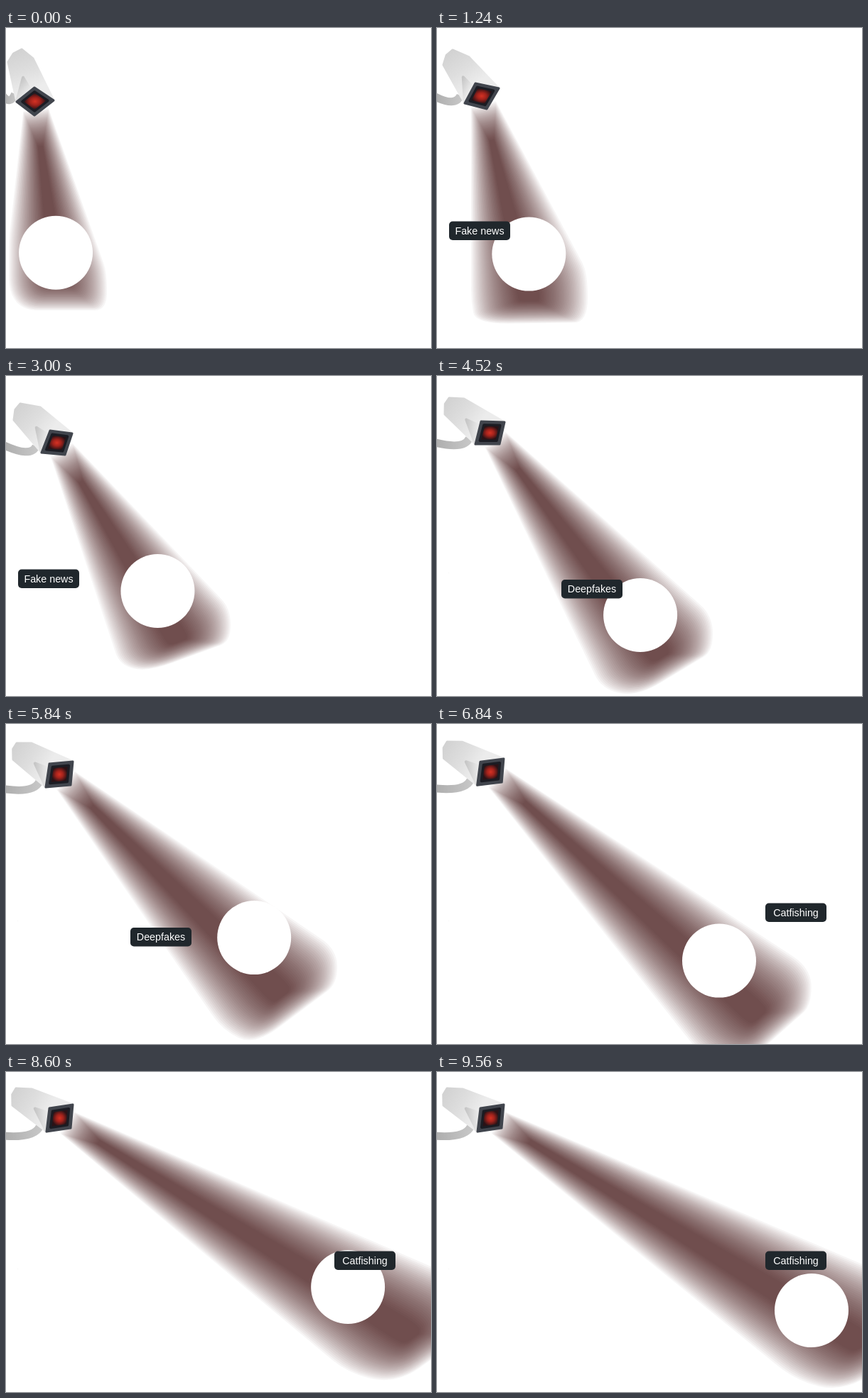
Animation, 598 px wide and 451 px high, one loop 9.6 s. Source, as an HTML page:

```html
<!DOCTYPE html>
<html lang="en">
<head>
<meta charset="utf-8">
<title>Searchlight camera</title>
<style>
  html, body { margin: 0; width: 100%; height: 100%; overflow: hidden; background: #fff; }
  svg { display: block; width: 598px; height: 451px; }
  text { font: 14.3px "Liberation Sans", Arial, sans-serif; fill: #fff; text-anchor: middle; }
</style>
</head>
<body>
<svg id="stage" viewBox="0 0 598 451">
  <defs>
    <linearGradient id="metal" gradientUnits="userSpaceOnUse">
      <stop offset="0" stop-color="#d2d2d2"/>
      <stop offset=".55" stop-color="#dedede"/>
      <stop offset="1" stop-color="#ececec"/>
    </linearGradient>
    <linearGradient id="under" gradientUnits="userSpaceOnUse">
      <stop offset="0" stop-color="#c6c6c6"/>
      <stop offset="1" stop-color="#f0f0f0"/>
    </linearGradient>
    <linearGradient id="tube">
      <stop offset="0" stop-color="#acacac"/>
      <stop offset="1" stop-color="#c6c6c6"/>
    </linearGradient>
    <radialGradient id="glow">
      <stop offset="0" stop-color="#d43224"/>
      <stop offset=".45" stop-color="#a3231c"/>
      <stop offset="1" stop-color="#2a1216"/>
    </radialGradient>
  </defs>
  <g id="beam" fill="#401616"></g>
  <circle id="disc" r="52" fill="#fff"/>
  <path id="arm" fill="none" stroke="url(#tube)" stroke-width="11"/>
  <path id="body" fill="url(#metal)" stroke="url(#metal)" stroke-width="3" stroke-linejoin="round"/>
  <path id="belly" fill="url(#under)" stroke="url(#under)" stroke-width="4" stroke-linejoin="round"/>
  <path id="bezel" fill="#41454d" stroke="#41454d" stroke-width="3" stroke-linejoin="round"/>
  <path id="glass" fill="#1b1c23" stroke="#1b1c23" stroke-width="4" stroke-linejoin="round"/>
  <path id="eye" fill="url(#glow)" stroke-linejoin="round"/>
  <g id="labels"></g>
</svg>
<script>
const LOOP = 9600, LAYERS = 30, NS = 'http://www.w3.org/2000/svg';
const $ = id => document.getElementById(id);

// far end of the light: lower edge, bottom, right, upper edge
const beamTimes = [0, 1240, 3000, 4520, 5840, 7840, 9000];
const beamKeys = [
  [4, 300, 4, 398, 142, 398, 142, 345],
  [48, 385, 54, 417, 212, 415, 212, 345],
  [160, 408, 200, 417, 316, 374, 316, 328],
  [232, 442, 282, 452, 388, 388, 388, 338],
  [305, 432, 350, 453, 466, 366, 466, 318],
  [440, 446, 510, 455, 592, 375, 592, 316],
  [505, 435, 570, 451, 690, 380, 690, 310]
];

// lens corners clockwise, then back of the housing: left, top, right
const camTimes = [0, 1240, 3000, 4520, 5840, 7840];
const camKeys = [
  [40, 84, 67, 102, 40, 123, 15, 104, 3, 48, 22, 30, 38, 43],
  [54, 78, 87, 85, 70, 114, 39, 106, 9, 52, 22, 31, 45, 41],
  [62, 77, 93, 81, 83, 111, 50, 108, 11, 62, 20, 39, 48, 44],
  [62, 64, 95, 65, 88, 96, 54, 96, 11, 54, 17, 31, 38, 32],
  [61, 56, 94, 53, 91, 86, 56, 89, 10, 50, 15, 27, 36, 27],
  [61, 51, 94, 46, 91, 79, 57, 84, 9, 47, 14, 23, 36, 24]
];

const labels = [
  ['Fake news', 17, 272.5, 800, 3600],
  ['Deepfakes', 175, 287, 3600, 6400],
  ['Catfishing', 462, 252.5, 6400, 9600]
];

function add(parent, tag, attrs) {
  const el = document.createElementNS(NS, tag);
  set(el, attrs);
  parent.appendChild(el);
  return el;
}
function set(el, attrs) {
  for (const name in attrs) el.setAttribute(name, attrs[name]);
}

const bob = t => 18 * Math.cos(2 * Math.PI * (t - 4500) / 2600);
const mix = (p, q, k) => [p[0] + (q[0] - p[0]) * k, p[1] + (q[1] - p[1]) * k];
const xy = p => p[0].toFixed(2) + ' ' + p[1].toFixed(2);
const poly = pts => 'M' + pts.map(xy).join('L') + 'Z';
const pairs = v => Array.from({ length: v.length / 2 }, (_, i) => [v[2 * i], v[2 * i + 1]]);

// smooth curve through the keys
function sample(times, keys, t) {
  const last = times.length - 1;
  if (t >= times[last]) return keys[last];
  let i = 0;
  while (t >= times[i + 1]) i++;
  const span = times[i + 1] - times[i], u = (t - times[i]) / span;
  const slope = (j, n) => {
    const a = Math.max(0, j - 1), b = Math.min(last, j + 1);
    return (keys[b][n] - keys[a][n]) / (times[b] - times[a]) * span;
  };
  return keys[i].map((p, n) => {
    const d = keys[i + 1][n] - p, m = slope(i, n), e = slope(i + 1, n);
    return p + u * (m + u * (3 * d - 2 * m - e + u * (m + e - 2 * d)));
  });
}

// keys of the light without the bobbing, which is added back at each moment
const calmKeys = beamKeys.map((key, i) =>
  key.map((v, n) => n % 2 ? v - bob(beamTimes[i]) : v));

const layers = Array.from({ length: LAYERS }, () =>
  add($('beam'), 'path', { 'fill-opacity': 1 - Math.pow(0.29, 1 / LAYERS) }));

const tags = labels.map(([word, x, y]) => {
  const g = add($('labels'), 'g', { transform: `translate(${x} ${y})` });
  add(g, 'rect', { width: 86, height: 26.5, rx: 5, fill: '#20272c' });
  add(g, 'text', { x: 43, y: 18 }).textContent = word;
  return g;
});

function drawBeam(t, lens) {
  const now = Math.min(t, 9000);
  const far = pairs(sample(beamTimes, calmKeys, now)).map(p => [p[0], p[1] + bob(now)]);
  const mid = mix(mix(far[0], far[3], 0.5), mix(far[1], far[2], 0.5), 0.5);
  const dx = mid[0] - lens[0], dy = mid[1] - lens[1], len = Math.hypot(dx, dy);
  const ux = dx / len, uy = dy / len;
  const at = (d, side) => [lens[0] + ux * d - uy * side, lens[1] + uy * d + ux * side];
  const start = at(75, 0), end = mix(lens, mid, 0.96);
  const near = [at(12, 18), at(12, -18)];
  layers.forEach((path, i) => {
    const k = 1 - 0.82 * i / (LAYERS - 1);
    const [n1, n2] = near.map(p => mix(start, p, k));
    const [a, b, c, d] = far.map(p => mix(end, p, k));
    const r = 0.3;
    path.setAttribute('d', `M${xy(n1)}L${xy(mix(a, n1, 0.06))}Q${xy(a)} ${xy(mix(a, b, 0.5))}` +
      `Q${xy(b)} ${xy(mix(b, c, r))}L${xy(mix(c, b, 0.12))}Q${xy(c)} ${xy(mix(c, d, 0.5))}` +
      `Q${xy(d)} ${xy(mix(d, n2, 0.06))}L${xy(n2)}Z`);
  });
}

function drawCamera(pts, lens) {
  const [a, b, c, d, left, top, right] = pts;
  const shrink = k => [a, b, c, d].map(p => mix(lens, p, k));
  const joint = mix(left, d, 0.8);
  const bend = [joint[0] - 7, joint[1] + 17];
  $('arm').setAttribute('d', `M-5 ${(joint[1] * 0.3 + 67).toFixed(2)}Q${xy(bend)} ${xy(joint)}`);

  const corner = mix(left, top, 0.55);
  corner[0] -= 3;
  corner[1] -= 2;
  $('body').setAttribute('d', poly([left, corner, top, right, b, a, d]));
  set($('metal'), { x1: top[0], y1: top[1], x2: a[0], y2: a[1] });

  const tip = mix(mix(left, right, 0.5), mix(a, d, 0.5), 0.5);
  $('belly').setAttribute('d', poly([tip, mix(a, d, 0.2), d, mix(tip, d, 0.3)]));
  set($('under'), { x1: tip[0], y1: tip[1], x2: a[0], y2: a[1] });

  $('bezel').setAttribute('d', poly(shrink(1)));
  $('glass').setAttribute('d', poly(shrink(0.68)));
  $('eye').setAttribute('d', poly(shrink(0.6)));
}

function draw(t) {
  const pts = pairs(sample(camTimes, camKeys, t));
  const lens = mix(mix(pts[0], pts[2], 0.5), mix(pts[1], pts[3], 0.5), 0.5);
  drawBeam(t, lens);
  drawCamera(pts, lens);
  set($('disc'), { cx: 70 + 0.0478 * t, cy: 319 + bob(t) });
  tags.forEach((g, i) => {
    const on = t >= labels[i][3] && t < labels[i][4];
    g.setAttribute('visibility', on ? 'visible' : 'hidden');
  });
}

const began = performance.now();
function tick() {
  draw((performance.now() - began) % LOOP);
  requestAnimationFrame(tick);
}
draw(0);
requestAnimationFrame(tick);
</script>
</body>
</html>
```
